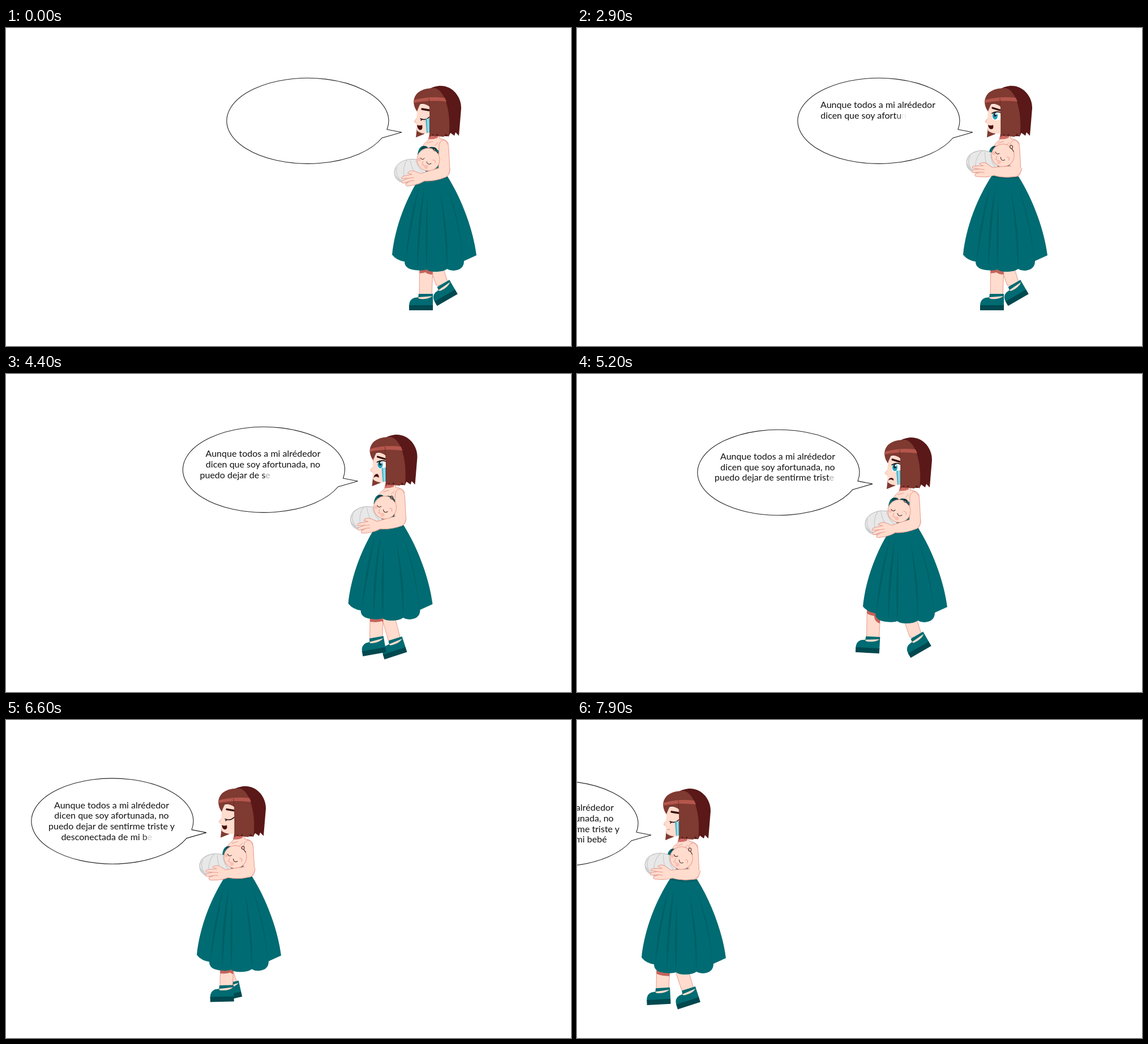
An HTML page for the animation above (8 s loop, 998x561 px).

```html
<!DOCTYPE html>
<html lang="es">
<head>
<meta charset="utf-8">
<style>
html, body { margin: 0; width: 100%; height: 100%; overflow: hidden; background: #fff; }
svg { display: block; }
text { font: 16px Lato, sans-serif; text-anchor: middle; fill: #111; }
.line { fill: none; stroke-linecap: round; stroke-linejoin: round; }
.skin { fill: #ffdccd; stroke: #e79a90; stroke-width: 1; }
.teal { fill: #006b72; }
.deep { fill: #00484f; }
.dark { fill: #5a1818; }
.brown { fill: #7f3a31; }
.fold { fill: #005f66; }
</style>
</head>
<body>
<svg width="998" height="561" viewBox="0 0 998 561">
  <defs>
    <!-- Origin at the ankle -->
    <g id="shoe">
      <path class="teal" d="M-12 2H13V23H-29Q-29 12-20 9L-13 8Z"/>
      <path fill="#ffdccd" d="M-13 8L12 6Q5 12-8 11Q-13 11-13 8Z"/>
      <path class="deep" d="M-29 22H13V31H-29Z"/>
    </g>
    <path id="skirt" d="M733 260Q756 265 780 262C807 305 826 360 831 401L809 411Q809 427 790 428Q784 428 779 425Q773 430 758 430Q747 430 743 426Q736 429 722 427Q704 425 704 412Q690 410 682 400C687 350 708 298 733 260Z"/>
    <clipPath id="onLeg"><use href="#legL"/></clipPath>
  </defs>
  <g id="scene">
    <path fill="#fff" stroke="#222" stroke-width="1.1" d="M673 179L699 184L664 194A143 75.5 0 1 1 673 179Z"/>
    <g id="speech"></g>

    <path id="legR" class="skin"/>
    <use id="shoeR" href="#shoe"/>
    <path id="legL" class="skin"/>
    <g clip-path="url(#onLeg)"><use href="#skirt" x="-2" y="5" fill="#c4635b"/></g>
    <use id="shoeL" href="#shoe"/>

    <!-- Torso -->
    <path class="skin" d="M749 186L746 198Q738 203 735 211L740 262H778L781 203Q777 196 766 195V186Z"/>
    <path fill="#cf6d67" d="M748 186H766L762 194Q754 197 746 196Z"/>
    <path class="line" stroke="#e79a90" d="M744 203L754 200M758 207L763 202"/>
    <path class="teal" d="M734 209Q742 207 746 213Q752 207 760 213L765 217L766 240L780 264H733L738 240L727 224Q728 212 734 209Z"/>
    <path class="deep" d="M734 209Q742 206 746 212Q752 207 761 213L758 219Q751 213 746 219Q740 213 733 214Z"/>

    <!-- Skirt -->
    <use href="#skirt" class="teal"/>
    <path class="fold" d="M729 282Q710 345 706 412Q716 350 729 282ZM739 280Q724 350 727 425Q732 350 739 280ZM744 300Q739 370 743 426Q746 370 744 300ZM767 290Q776 360 779 425Q783 365 767 290ZM780 285Q802 350 807 412Q803 340 780 285ZM733 260Q756 265 780 262V265Q754 269 732 263Z"/>

    <!-- Head -->
    <path class="dark" d="M745 109C778 89 805 116 804 142L800 190L794 184L792 190L785 185L782 191L750 190L740 130Z"/>
    <path class="brown" d="M725 133L727 165L724 193L739 187L740 140Z"/>
    <path fill="#ffdccd" d="M727 137L725 160L721 165L725 169L726 181Q733 188 749 186L752 132Z"/>
    <path class="line" stroke="#e79a90" stroke-width=".8" d="M725 160L721 165L725 168"/>
    <g id="open">
      <path fill="#fff" d="M733 150Q741 145 748 149V161Q740 165 734 161Z"/>
      <ellipse cx="738.5" cy="155" rx="4.6" ry="6.4" fill="#2a9fb9"/>
      <ellipse cx="738.5" cy="153" rx="2.4" ry="3.6" fill="#17303c"/>
      <circle cx="740" cy="151.5" r="1.5" fill="#fff"/>
      <path class="line" stroke="#24100f" stroke-width="1.7" d="M733 150.5Q740 146 748 149"/>
      <path class="line" stroke="#3a0f10" stroke-width="3.2" d="M734 141L747 145"/>
    </g>
    <g id="closed" class="line" stroke="#24100f">
      <path stroke-width="1.5" d="M732 160Q741 164 748 157M735 161L733 163"/>
      <path stroke="#3a0f10" stroke-width="3.4" d="M735 143L747 145"/>
    </g>
    <g id="tear">
      <path fill="#b4e3ec" d="M741 161L749 159V185H743Z"/>
      <path fill="#4cb6cc" d="M741 161L744 160.5L745 185H743ZM746.5 160H749V185H747Z"/>
    </g>
    <path id="mouth"/>
    <path class="brown" d="M720 131C721 114 734 106 757 106C778 110 787 157 782 192L777 186L773 192L764 191L762 186L758 192L754 187L748.5 193V139Q739 132 731 135L726 147Q721 141 720 131Z"/>
    <path fill="#b5564c" d="M721 127Q747 120 775 123L778 130Q748 126 720 132Z"/>
    <path class="line" stroke="#652820" stroke-width=".8" d="M747 124Q750 155 749 190"/>

    <path class="skin" d="M765 206Q768 196 775 198Q782 203 782 213L784 252Q782 263 774 262L764 250Z"/>

    <!-- Baby and forearm, turning about the elbow -->
    <g id="cradle">
      <path fill="#e8e8e8" stroke="#b5b5b5" d="M730 233C706 227 685 239 686 257C688 270 699 275 714 273L745 259Z"/>
      <path class="line" stroke="#c4c4c4" d="M709 232Q699 245 704 266M714 234Q717 250 727 262M724 234Q728 247 737 255M690 246Q686 260 700 271"/>
      <path fill="#cfcfcf" d="M686 257Q690 265 703 270L713 273Q690 276 686 257Z"/>
      <circle class="skin" cx="746" cy="232" r="20"/>
      <g fill="#f9bfb3"><circle cx="730" cy="232" r="3"/><circle cx="742" cy="245" r="3.4"/></g>
      <path class="line" stroke="#3a1715" d="M732 229Q735 234 739 230M743 236Q745 243 751 239M758 217Q752 216 756 211Q761 211 759 217L763 221"/>
      <path class="line" stroke="#df867e" stroke-width=".8" d="M737 235Q734 239 737 240M734 241L739 243M754 233Q760 232 758 238"/>
      <path class="skin" stroke-linejoin="round" d="M765 247Q750 251 733 257L720 252Q713 251 709 256Q712 257 717 258L703 261Q697 263 699 266L711 265L701 269Q697 272 701 274L714 270L706 275Q705 279 710 279L721 277Q731 275 739 270Q757 271 777 263Q784 260 784 246"/>
      <path class="line" stroke="#e79a90" d="M711 265L720 264M714 270L721 269"/>
    </g>
  </g>
</svg>
<script>
const $ = id => document.getElementById(id);
const LOOP = 8000, CHAR_MS = 61.5;
const lines = ['Aunque todos a mi alrédedor', 'dicen que soy afortunada, no',
  'puedo dejar de sentirme triste y', 'desconectada de mi bebé'];

// time, x, y of the whole scene
const route = [[0, 0, 0], [3900, 0, 0], [4500, -93, 6], [5400, -201, 11],
  [6300, -309, 14], [6800, -369, 15], [7200, -453, 16], [7900, -568, 19]];
// time, then ankle x, y and shoe angle for the left and right leg
const gait = [[0, 741, 467, 0, 771, 449, -30], [3800, 741, 467, 0, 771, 449, -30],
  [4400, 731, 457.5, -10, 764, 460, -18], [5200, 699.5, 451.5, 3, 776, 449.5, -30],
  [6100, 715, 450, 1, 757.5, 447, -27], [7100, 721, 452.5, -4, 760, 453, -18],
  [7900, 719, 451.5, -3, 764, 453, -18]];

const clamp = v => Math.max(0, Math.min(1, v));

function sample(keys, t) {
  let i = 0;
  while (i < keys.length - 2 && t >= keys[i + 1][0]) i++;
  const [a, b] = [keys[i], keys[i + 1]];
  const u = clamp((t - a[0]) / (b[0] - a[0]));
  return { u, v: a.slice(1).map((p, k) => p + (b[k + 1] - p) * u) };
}

const letters = [];
lines.forEach((line, row) => {
  const text = document.createElementNS('http://www.w3.org/2000/svg', 'text');
  text.setAttribute('x', 531.5);
  text.setAttribute('y', 141 + row * 18.8);
  for (const c of line) {
    const span = document.createElementNS(text.namespaceURI, 'tspan');
    span.textContent = c;
    text.append(span);
    letters.push(span);
  }
  $('speech').append(text);
});

function leg(side, x, y, angle, lean) {
  const top = x + lean;
  $('leg' + side).setAttribute('d',
    `M${top - 12} 400L${x - 11} ${y + 5}H${x + 11}L${top + 12} 400Z`);
  $('shoe' + side).setAttribute('transform', `translate(${x} ${y}) rotate(${angle})`);
}

function mouth(t) {
  const h = 6 + 2 * Math.cos(t * Math.PI / 250);
  if (t >= 6650) return 'M727 174Q730 173 733 174.5L727 174.8Z';
  return t > 3500 && t < 5700
    ? `M727 178Q728 ${177 - h} 734 ${178 - h}Q737 175 736 178Q731 174 727 178Z`
    : `M726 171Q731 173 735 171Q737 ${172 + h} 731 ${172 + h}Q727 ${171 + h} 726 171Z`;
}

function draw(t) {
  const [x, y] = sample(route, t).v;
  $('scene').setAttribute('transform', `translate(${x} ${y})`);

  letters.forEach((s, i) => s.setAttribute('fill-opacity', clamp((t / CHAR_MS - i) / 1.6)));

  const { u, v } = sample(gait, t);
  const swing = t > 3800 ? Math.sin(Math.PI * u) ** 2 : 0;
  leg('L', v[0] + 16 * swing, v[1], v[2], 2);
  leg('R', v[3] - 16 * swing, v[4] - 4 * swing, v[5] + 10 * swing, -18);

  const lift = 7 * (1 - Math.cos(t * 2 * Math.PI / 5100));
  $('cradle').setAttribute('transform', `rotate(${lift} 780 255)`);

  const awake = t > 900 && t < 5700;
  $('open').setAttribute('visibility', awake ? 'visible' : 'hidden');
  $('closed').setAttribute('visibility', awake ? 'hidden' : 'visible');

  const cry = (t + 1400) % 4200;
  $('tear').setAttribute('transform', `translate(0 160) scale(1 ${clamp((cry - 100) / 500)}) translate(0 -160)`);
  $('tear').setAttribute('opacity', clamp((3800 - cry) / 300));

  $('mouth').setAttribute('d', mouth(t));
  $('mouth').setAttribute('fill', t < 6650 ? '#4a1010' : '#d4766f');
}

const start = performance.now();
function tick() {
  const t = (performance.now() - start) % LOOP;
  draw(Math.floor(t / 100) * 100);
  requestAnimationFrame(tick);
}
tick();
</script>
</body>
</html>
```
